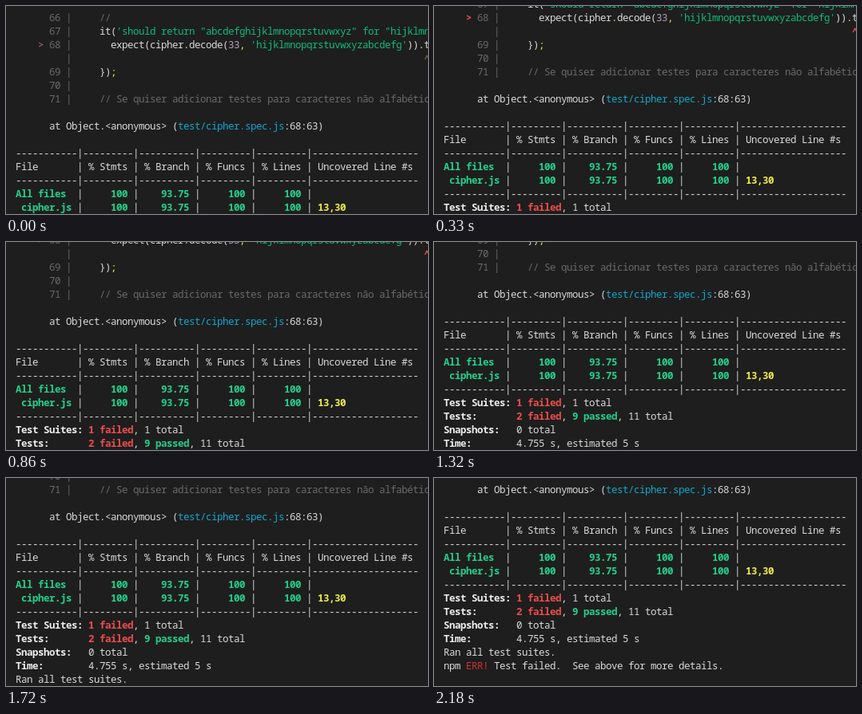
Recreate the animation shown at these times as an HTML page. Size 528 by 261 pixels, loop 3.6 s.

```html
<!DOCTYPE html>
<html lang="en">
<head>
<meta charset="utf-8">
<style>
  html, body {
    margin: 0;
    width: 100%;
    height: 100%;
    overflow: hidden;
    background: #1e1e1e;
  }
  #screen {
    position: relative;
    width: 100%;
    height: 100%;
    overflow: hidden;
    contain: strict;
  }
  #term {
    position: absolute;
    left: 12px;
    top: 6px;
    margin: 0;
    color: #dadada;
    font: 12.5px/17px "Noto Sans Mono", "DejaVu Sans Mono", monospace;
    letter-spacing: calc(7px - 1ch);
    font-variant-ligatures: none;
  }
  #term div { height: 17px; white-space: pre; }
  .dim { color: #6a6a6a; }
  .str { color: #0dbc79; }
  .num { color: #b5a0b5; }
  .punc { color: #e2e258; }
  .path { color: #11a8cd; }
  .err { color: #cd3131; }
  .mark, .fail, .pass, .warn, .bold { font-weight: 600; }
  .mark { color: var(--mark); }
  .fail { color: #f14c4c; }
  .pass { color: #23d18b; }
  .warn { color: #f0ec48; }
  .bold { color: #ededed; }
</style>
</head>
<body>
<div id="screen"><pre id="term"></pre></div>
<script>
const ROW = 17, TOP = 6, LOOP = 3600;
// moments at which the terminal scrolls up by one row
const SCROLLS = [130, 330, 860, 1190, 1320, 1720, 1850, 2180];

const term = document.getElementById('term');

// a row is a list of plain strings and [style, text] pairs
function print(...parts) {
  const row = document.createElement('div');
  for (const part of parts) {
    if (typeof part === 'string') {
      row.append(part);
      continue;
    }
    const span = document.createElement('span');
    [span.className, span.textContent] = part;
    row.append(span);
  }
  term.append(row);
}

const code = (no, ...parts) =>
  print(['dim', String(no).padStart(8) + ' |'], '     ', ...parts);

const widths = [11, 9, 10, 9, 9, 19];
const rule = () => print(widths.map(w => '-'.repeat(w)).join('|'));

function stats(name, lines) {
  const cells = ['100', '93.75', '100', '100'].flatMap((v, i) =>
    ['|', ['pass', v.padStart(widths[i + 1] - 1)], ' ']);
  print(['pass', name.padEnd(11)], ...cells, '| ', ['warn', lines]);
}

const summary = (label, ...parts) =>
  print(['bold', label.padEnd(13)], ...parts);

const abc = 'abcdefghijklmnopqrstuvwxyz';
const shifted = abc.slice(7) + abc.slice(0, 7);

code(66, ['dim', '//']);
code(67, 'it(', ['str', `'should return "${abc}" for "${shifted}"'`]);
print(['mark', '    >'], ['dim', ' 68 |'], '       expect(cipher', ['punc', '.'],
  'decode(', ['num', '33'], ['punc', ','], ' ', ['str', `'${shifted}'`],
  '))', ['punc', '.'], 'toBe(');
print(['dim', '         |'], ' '.repeat(63), ['mark', '^']);
code(69, '})', ['punc', ';']);
code(70);
code(71, ['dim', '// Se quiser adicionar testes para caracteres não alfabéticos']);
print();
print('      at Object.<anonymous> (', ['path', 'test/cipher.spec.js'], ':68:63)');
print();
rule();
print('File       | % Stmts | % Branch | % Funcs | % Lines | Uncovered Line #s');
rule();
stats('All files', '');
stats(' cipher.js', '13,30');
rule();
summary('Test Suites:', ['fail', '1 failed'], ', 1 total');
summary('Tests:', ['fail', '2 failed'], ', ', ['pass', '9 passed'], ', 11 total');
summary('Snapshots:', '0 total');
summary('Time:', '4.755 s, estimated 5 s');
print('Ran all test suites.');
print('npm ', ['err', 'ERR!'], ' Test failed.  See above for more details.');
print();

function draw(t) {
  const step = SCROLLS.filter(s => t >= s).length;
  term.style.top = TOP - step * ROW + 'px';
  // the marker stays muted until the first result line is out
  term.style.setProperty('--mark', step < 2 ? '#7d5856' : '#f14c4c');
}

const start = performance.now();
function tick() {
  draw((performance.now() - start) % LOOP);
  requestAnimationFrame(tick);
}
tick();
</script>
</body>
</html>
```
